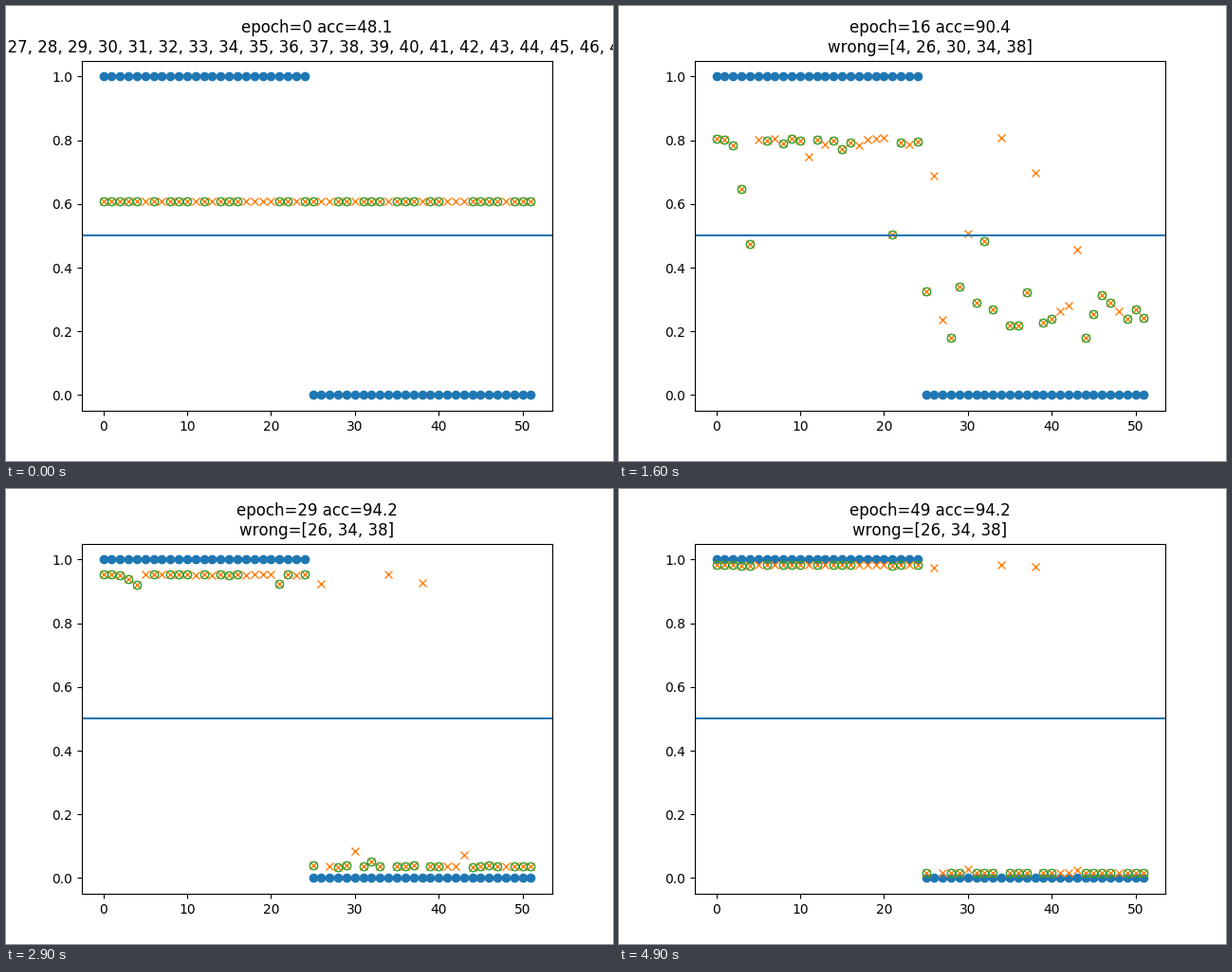
These frames come from a looping animation (640x480 px, 5000 ms). A matplotlib script:

```python
import numpy as np
import matplotlib.pyplot as plt
from matplotlib.animation import FuncAnimation

EPOCHS, INTERVAL = 50, 100
POSITIVE, TOTAL = 25, 52
SPLIT = 16  # the classes are fully separated from this epoch on

plt.rcParams["text.kerning_factor"] = 6

x = np.arange(TOTAL)
labels = x < POSITIVE
held_out = [5, 7, 11, 13, 17, 18, 19, 20, 23, 26, 27, 30, 34, 38, 41, 42, 43, 48]
train = np.setdiff1d(x, held_out)

# Three samples stay on the wrong side; a few others start far from their class.
upper = labels | np.isin(x, [26, 34, 38])
lag = {3: -.82, 4: -1.53, 21: -1.41, 26: -.63, 38: -.60,
       30: 1.11, 32: 1.01, 43: .90}
gap = np.array([lag.get(i, 0) for i in x])

rng = np.random.default_rng(3)
jitter = np.where(upper, -rng.exponential(.1, TOTAL), rng.normal(0, .25, TOTAL))
jitter[[*lag, 34]] = 0

# Trained samples catch up with their class faster than held-out ones.
catch_up = np.where(np.isin(x, train), 13, 60)

level_epochs = np.log([16, 18, 24, 29, 37, 49])
upper_level = [1.43, 1.90, 2.47, 3.01, 3.48, 4.05]
lower_level = [-1.08, -1.76, -2.58, -3.26, -3.68, -4.18]


def predict(epoch):
    age = max(0, epoch - SPLIT)
    at = np.log(SPLIT + age)
    level = np.where(upper, np.interp(at, level_epochs, upper_level),
                     np.interp(at, level_epochs, lower_level))
    target = level + gap * np.exp(-age / catch_up) + jitter * np.exp(-age / 8)
    # Early on a shared bias swings back and forth, then the classes part.
    bias = .435 * np.exp(-.115 * epoch) * np.cos(np.pi * epoch / 4.8)
    spread = np.clip((epoch - 5) / (SPLIT - 5), 0, 1) ** 2
    z = (bias if epoch < 12 else 0) + spread * target
    return 1 / (1 + np.exp(-z))


fig, ax = plt.subplots(figsize=(6.4, 4.8), dpi=100)
ax.plot(x, labels.astype(float), "o", color="C0")
predicted, = ax.plot(x, predict(0), "x", color="C1")
trained, = ax.plot(train, predict(0)[train], "o", color="C2", mfc="none")
ax.axhline(0.5, color="C0")
ax.set_xlim(-2.55, 53.55)
ax.set_ylim(-0.05, 1.05)
title = ax.set_title("")


def update(epoch):
    p = predict(epoch)
    predicted.set_ydata(p)
    trained.set_ydata(p[train])
    wrong = np.flatnonzero((p > 0.5) != labels).tolist()
    acc = 100 * (1 - len(wrong) / TOTAL)
    title.set_text(f"epoch={epoch} acc={acc:.1f}\nwrong={wrong}")
    return predicted, trained, title


anim = FuncAnimation(fig, update, frames=EPOCHS, interval=INTERVAL,
                     repeat=True, repeat_delay=0)
plt.show()
```
